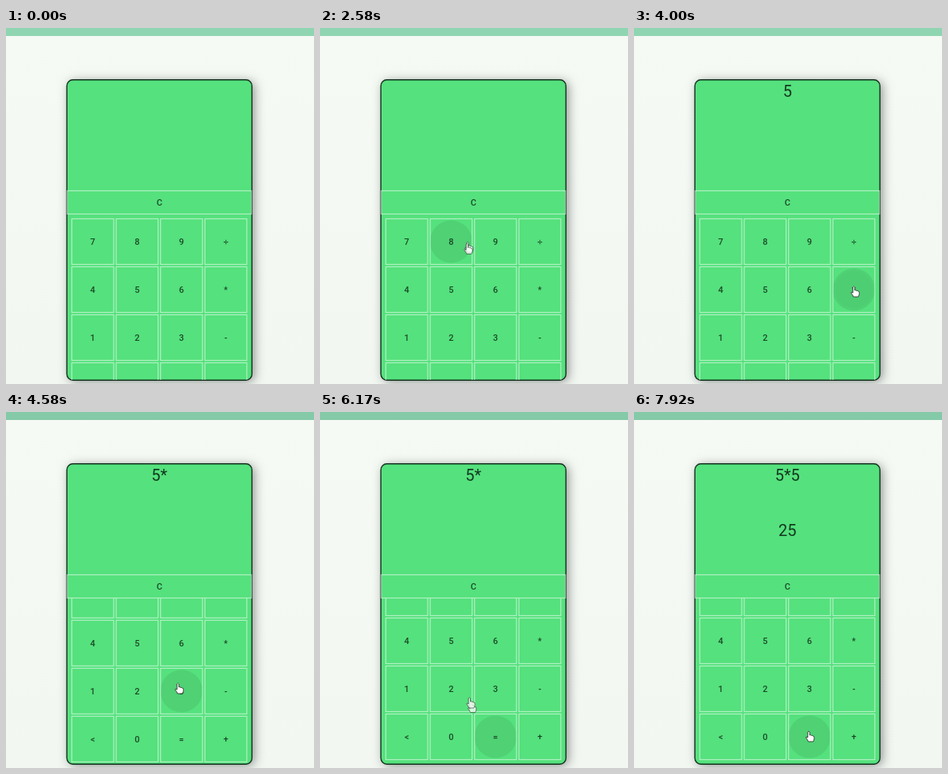
Animation, 386 px wide and 445 px high, one loop 8000 ms. Source, as an HTML page with a canvas:

```html
<!DOCTYPE html>
<html lang="en">
<head>
<meta charset="utf-8">
<title>Calculator</title>
<style>
  html, body { margin: 0; width: 100%; height: 100%; overflow: hidden; background: #f4f9f3; }
  canvas { display: block; width: 386px; height: 445px; }
</style>
</head>
<body>
<canvas id="stage" width="386" height="445"></canvas>
<script>
const ctx = document.getElementById("stage").getContext("2d");
const LOOP = 8000, STEP = 1000 / 12;
const GREEN = "#55e17d", LINE = "rgba(255,255,255,.52)";
const INK = "rgba(0,0,0,.68)", DARK = "#123820";

const KEYS = ["789÷", "456*", "123-", "<0=+"];
const GRID = { x: 82.5, y: 238.5, dx: 55.6, dy: 60, w: 52.5, h: 57 };
const VIEW = { x: 77, y: 233, w: 231, h: 207 };

// Each move eases out from the previous resting place
const ENTER = { x: 410, y: 227 };
const MOVES = [
  { at: 1450, ms: 850, x: 187, y: 262 },
  { at: 2550, ms: 530, x: 165, y: 323 },
  { at: 3480, ms: 350, x: 275.5, y: 323 },
  { at: 4150, ms: 410, x: 215.5, y: 339 },
  { at: 4830, ms: 420, x: 200, y: 398 },
  { at: 6100, ms: 330, x: 165, y: 285 },
  { at: 6560, ms: 610, x: 219, y: 399 }
];
const PRESSES = [
  { at: 3250, key: "5", entry: "5" },
  { at: 3920, key: "*", entry: "5*" },
  { at: 6400, key: "5", entry: "5*5" },
  { at: 7420, key: "=", entry: "5*5", result: "25" }
];
const PRESS_DELAY = 160;

const ARROW = new Path2D("M0 0V10L2.4 8L4 11.6L5.6 10.9L4 7.4H7Z");
const HAND = new Path2D("M-1.2 1Q0 -1 1.2 1V5Q2.4 4 3.4 5.4Q4.6 4.7 5.4 6.2" +
  "Q6.8 5.8 6.8 7.6V9.5Q6.6 11 5.6 13H-.6Q-1 11 -3.6 8Q-3.8 6.2 -1.2 8Z");

const clamp = v => Math.max(0, Math.min(1, v));
const easeOut = p => 1 - (1 - clamp(p)) ** 2;
const scrollAt = t => 41 * easeOut((t - 4130) / 616);

function pointerAt(t) {
  let { x, y } = ENTER;
  for (const m of MOVES) {
    const p = easeOut((t - m.at) / m.ms);
    x += (m.x - x) * p;
    y += (m.y - y) * p;
  }
  return { x, y };
}

function keyBox(row, col, scroll) {
  return { x: GRID.x + col * GRID.dx, y: GRID.y + row * GRID.dy - scroll };
}

function isOver(row, col, t) {
  const p = pointerAt(t), box = keyBox(row, col, scrollAt(t));
  const dx = p.x - box.x, dy = p.y - box.y;
  return p.y > VIEW.y && dx >= 0 && dx <= GRID.w && dy >= 0 && dy <= GRID.h;
}

// Highlight trails the pointer and fades over a short window
function hover(row, col, t) {
  let sum = 0;
  for (let d = 60; d < 210; d += 15) sum += isOver(row, col, t - d);
  return sum / 10;
}

function disc(x, y, r, alpha) {
  ctx.fillStyle = `rgba(0,0,0,${alpha})`;
  ctx.beginPath();
  ctx.arc(x, y, r, 0, Math.PI * 2);
  ctx.fill();
}

function label(text, x, y, font, color) {
  ctx.font = `${font} Roboto, sans-serif`;
  ctx.fillStyle = color;
  ctx.fillText(text, x, y);
}

function drawPage(t) {
  const bg = ctx.createLinearGradient(0, 0, 0, 445);
  bg.addColorStop(0, "#f5faf4");
  bg.addColorStop(1, "#f2f7f2");
  ctx.fillStyle = bg;
  ctx.fillRect(0, 0, 386, 445);
  ctx.fillStyle = t < 4160 ? "#8fd5b1" : "#85caa8";
  ctx.fillRect(0, 0, 386, 10);
}

function traceCase() {
  ctx.beginPath();
  ctx.roundRect(76.3, 64.7, 231.9, 375.6, 7.5);
}

function drawCase() {
  ctx.save();
  ctx.shadowColor = "rgba(0,0,0,.42)";
  ctx.shadowBlur = 13;
  ctx.shadowOffsetX = 3;
  ctx.shadowOffsetY = 2;
  ctx.fillStyle = GREEN;
  traceCase();
  ctx.fill();
  ctx.restore();
  ctx.strokeStyle = "#15301f";
  ctx.lineWidth = 1.4;
  traceCase();
  ctx.stroke();
}

function drawKey(row, col, t, scroll) {
  const { x, y } = keyBox(row, col, scroll);
  const key = KEYS[row][col];
  const cx = x + GRID.w / 2, cy = y + GRID.h / 2;
  ctx.save();
  ctx.beginPath();
  ctx.rect(x, y, GRID.w, GRID.h);
  ctx.clip();
  const level = hover(row, col, t);
  if (level) disc(cx, cy, 26.5, 0.07 * level);
  for (const press of PRESSES) {
    const p = (t - press.at) / 350;
    if (press.key === key && p > 0 && p < 1) {
      disc(cx, cy, 26 * Math.min(1, p * 4), 0.02 * (1 - p));
    }
  }
  ctx.restore();
  ctx.strokeRect(x, y, GRID.w, GRID.h);
  label(key, cx, cy + 3.9, "500 11px", INK);
}

function drawKeys(t) {
  const scroll = scrollAt(t);
  ctx.save();
  ctx.beginPath();
  ctx.rect(VIEW.x, VIEW.y, VIEW.w, VIEW.h);
  ctx.clip();
  ctx.strokeStyle = LINE;
  ctx.lineWidth = 1.2;
  for (let r = 0; r < 4; r++) {
    for (let c = 0; c < 4; c++) drawKey(r, c, t, scroll);
  }
  ctx.restore();
}

function drawDisplay(t) {
  const last = PRESSES.filter(p => p.at + PRESS_DELAY <= t).pop();
  if (last) {
    label(last.entry, 192.3, 86, "20px", DARK);
    label(last.result || "", 192.3, 155, "20px", DARK);
  }
  ctx.strokeStyle = LINE;
  ctx.lineWidth = 1.2;
  ctx.strokeRect(76.7, 203.5, 231, 29);
  label("C", 192.3, 221.7, "500 11px", INK);
}

function drawPointer({ x, y }, alpha) {
  const onKeys = x > VIEW.x && x < 303 && y > VIEW.y && y < 440;
  const shape = onKeys ? HAND : ARROW;
  ctx.save();
  ctx.globalAlpha = alpha;
  ctx.translate(x, y);
  ctx.fillStyle = "#fff";
  ctx.fill(shape);
  ctx.strokeStyle = "#222";
  ctx.lineWidth = 0.8;
  ctx.lineJoin = "round";
  ctx.stroke(shape);
  ctx.restore();
}

// A moving pointer leaves a short double exposure
function drawPointers(t) {
  const now = pointerAt(t), before = pointerAt(t - 10);
  const moving = Math.hypot(now.x - before.x, now.y - before.y) > 1;
  if (moving) drawPointer(before, 0.7);
  drawPointer(now, moving ? 0.75 : 1);
}

function render(ms) {
  const t = Math.floor((ms % LOOP + 4) / STEP) % 96 * STEP;
  ctx.textAlign = "center";
  drawPage(t);
  drawCase();
  drawDisplay(t);
  drawKeys(t);
  drawPointers(t);
}

const start = performance.now();
function tick() {
  render(performance.now() - start);
  requestAnimationFrame(tick);
}
tick();
</script>
</body>
</html>
```
